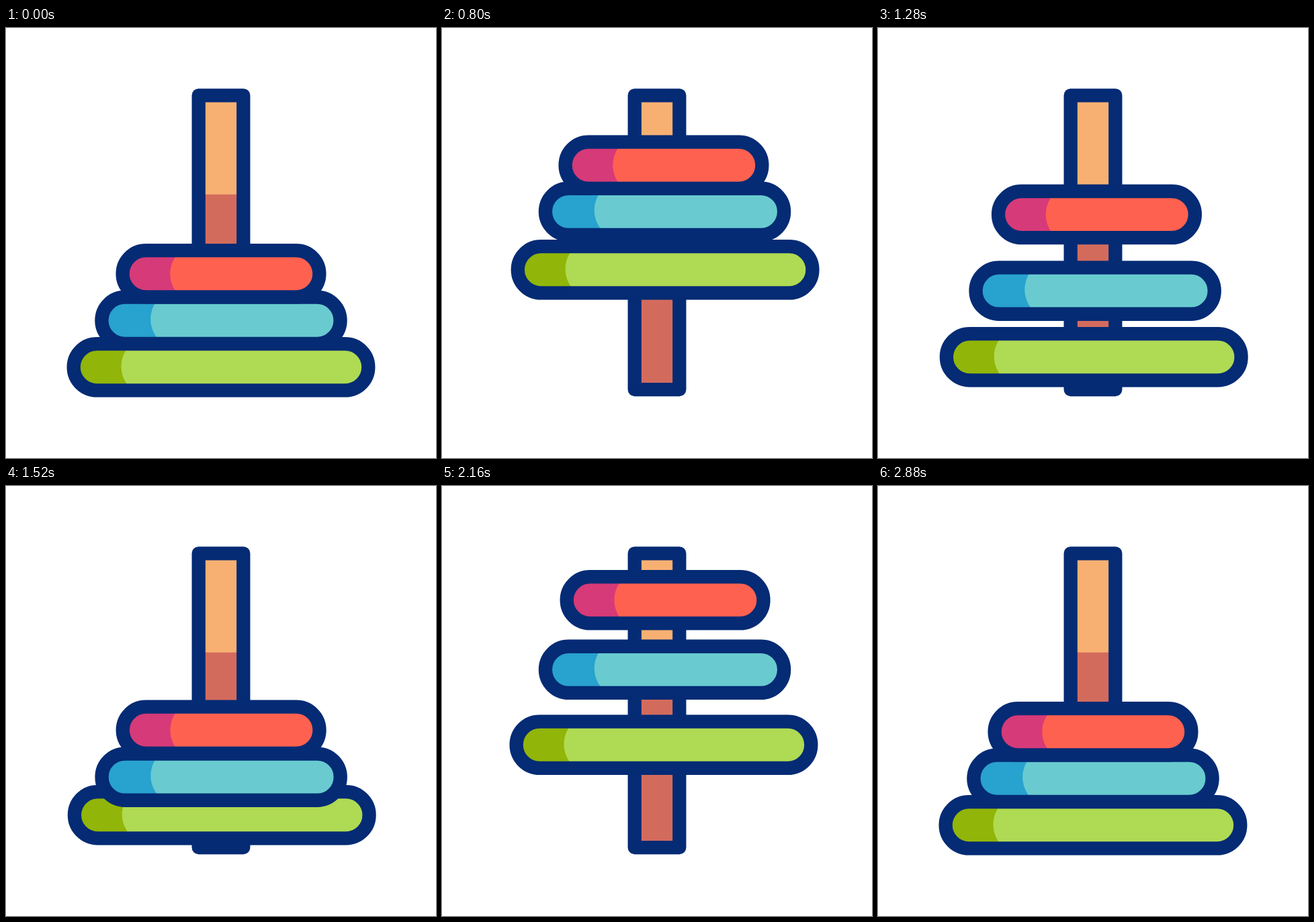
Animation of 640 by 640 pixels, one loop 3 s. Source, as an HTML page with a canvas:

```html
<!DOCTYPE html>
<html lang="en">
<head>
<meta charset="utf-8">
<title>Stacking rings</title>
<style>
  html, body { margin: 0; height: 100%; overflow: hidden; background: #fff; }
  canvas { display: block; }
</style>
</head>
<body>
<canvas id="stage" width="640" height="640"></canvas>
<script>
const ctx = document.getElementById('stage').getContext('2d');
const LOOP = 3000, STEP = 40, HALF = 600, NAVY = '#042b74';

// Bottom ring first: later rings cover earlier ones.
const rings = [
  { y: 504.8, width: 438.7, split: 171.5, bend: -1, start: 200, lift: 145, light: '#afda53', dark: '#91b508' },
  { y: 435.3, width: 355.2, split: 215.2, bend: -2, start: 280, lift: 170.2, light: '#69cbd0', dark: '#28a2ce' },
  { y: 365.8, width: 292.8, split: 244.3, bend: 0, start: 360, lift: 196, light: '#ff6150', dark: '#d63a78' }
];

const smooth = x => x * x * (3 - 2 * x);

// Height from 0 to 1: two smooth rises and falls.
function height(time) {
  if (time <= 0 || time >= 4 * HALF) return 0;
  const phase = time / HALF % 2;
  return smooth(phase < 1 ? phase : 2 - phase);
}

function outline() {
  ctx.strokeStyle = NAVY;
  ctx.lineWidth = 20.3;
  ctx.lineJoin = 'round';
  ctx.stroke();
}

function drawPole() {
  ctx.fillStyle = '#f7b072';
  ctx.fillRect(287, 100, 66, 148);
  ctx.fillStyle = '#d36b5d';
  ctx.fillRect(287, 247.7, 66, 290);
  ctx.beginPath();
  ctx.rect(286.7, 100.3, 66.6, 437.8);
  outline();
}

function drawRing(ring, time) {
  const h = height(time - ring.start), r = 34.6, bow = 45;
  const pill = new Path2D();
  pill.roundRect(320 - ring.width / 2, ring.y - r, ring.width, 2 * r, r);

  ctx.save();
  ctx.translate(12.1 * h, -ring.lift * h);
  ctx.save();
  ctx.clip(pill);
  ctx.fillStyle = ring.dark;
  ctx.fillRect(0, ring.y - r, 640, 2 * r);
  ctx.fillStyle = ring.light;
  ctx.beginPath();
  ctx.arc(ring.split + bow, ring.y + ring.bend, bow, Math.PI / 2, Math.PI * 1.5);
  ctx.lineTo(640, ring.y + ring.bend - bow);
  ctx.lineTo(640, ring.y + ring.bend + bow);
  ctx.fill();
  ctx.restore();
  ctx.strokeStyle = NAVY;
  ctx.lineWidth = 20.3;
  ctx.stroke(pill);
  ctx.restore();
}

function draw() {
  const time = Math.floor(performance.now() % LOOP / STEP) * STEP;
  ctx.clearRect(0, 0, 640, 640);
  drawPole();
  for (const ring of rings) drawRing(ring, time);
  requestAnimationFrame(draw);
}
draw();
</script>
</body>
</html>
```
